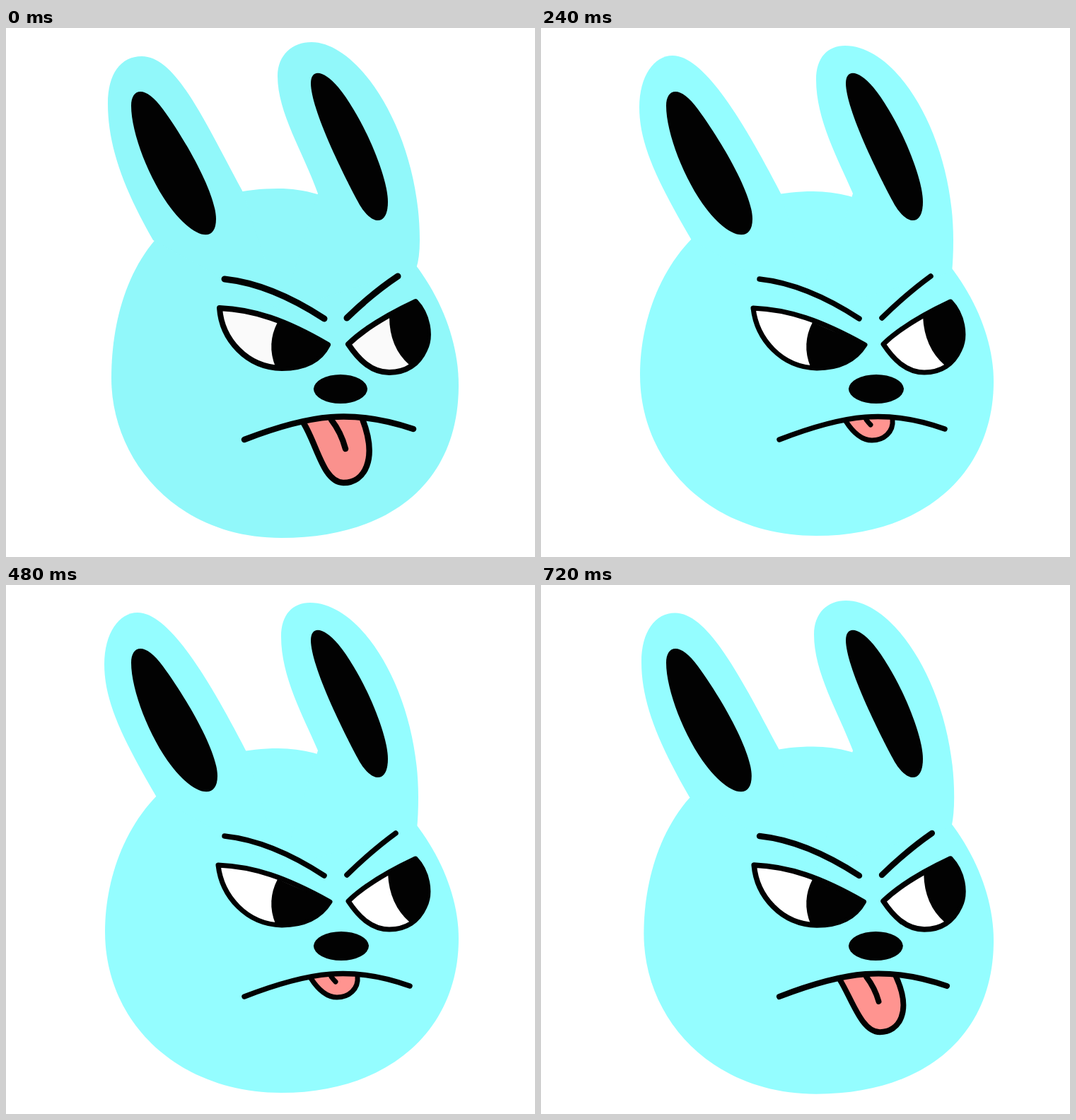
These frames come from a looping animation (748 px wide and 748 px high, 800 ms). An HTML page:

```html
<!DOCTYPE html>
<html lang="en">
<head>
<meta charset="utf-8">
<title>Cheeky rabbit</title>
<style>
html, body { margin: 0; width: 100%; height: 100%; overflow: hidden; background: #fff; }
svg { display: block; width: 100%; height: 100%; }
path { stroke-linecap: round; stroke-linejoin: round; }
</style>
</head>
<body>
<svg id="stage" viewBox="0 0 748 748"></svg>
<script>
const STEP = 80;
const STEPS = 10;
const INK = '#020202';
const SKIN = [148, 253, 255], WHITE = [255, 255, 255], PINK = [255, 148, 144];

// "a~b" in a path runs from a (tense) to b (calm).
const HEAD = `M149~140 495~490C149~140 370~380 205 227~231 385 227~231
  C520 227~231 640 370~375 640 505~500C640 645~630 540 721~718 389 721~718
  C240~245 721~718 149~140 610~620 149~140 495~490Z`;
const EARS = [
  `M208~213 300C165 225~218 144~139 165 144~139 107~112
   C144~139 65~68 162~160 40~39 192~186 40~39C240~230 40~39 280~285 130 334~339 230~234L390 400Z`,
  `M441 234C420 175~185 384~389 120~130 384~389 68~73C384~389 38~42 405 20~25 432~430 20~25
   C500~505 20~25 585~583 150~155 585~583 300Q585~583 325 580~581 340~345L390 400Z`
];
const INNER_EARS = [
  'M177 110C177 85 197 80 222 115C255 160 297~299 235 297~299 270C297~299 300 275 298 250 274C212 238 177 155 177 110Z',
  'M431 78C431 58 448 58 470 84C505 127 540 210 540 246C540 280 518 280 500 250C478 210 431 115 431 78Z'
];
const BROWS = ['M309 355Q375 362 450 411', 'M482 410Q518 375 554~551 351'];
const EYES = [
  'M302~300 396C350 398 395 413 455~458 448C443 472 420 481 390 481C340 480 305 440 302~300 396Z',
  'M484 447Q515 417 579 387C596 405 602 435 592 455C583 475 566 487 542 487C516 487 498 468 484 447Z'
];
const PUPILS = [
  'M384 416Q368 447 381 479Q435 482 455~458 448Z',
  'M542~540 408Q542 452 571 477Q594 462 597 430Q592 400 579 387Z'
];
const MOUTH = 'M337 582C430 546 490 538 576~571 567';

const mix = (a, b, k) => a + (b - a) * k;

function drawTongue(out, color, width) {
  const x = 468 + 9 * out + 7 * Math.sin(Math.PI * out);
  const y = 583 + 60 * out;
  const edge = `M${431 - 10 * out} ${556 + 3 * out}
    C440 ${570 + 20 * out} ${x - 16 - 12 * out} ${y} ${x} ${y}
    C${x + 16 + 14 * out} ${y} ${x + 31 + 18 * out} ${572 + 38 * out} ${497 + 7 * out * out} 553`;
  const crease = `M460 554Q${463 + 11 * out} ${558 + 14 * out} ${466 + 14 * out} ${561 + 34 * out}`;
  return `<path d="${edge}L470 551Z" fill="${color}"/>
    <path d="${edge}${crease}" fill="none" stroke="${INK}" stroke-width="${width}"/>`;
}

// calm: 0 tense to 1 relaxed; out: tongue length 0 to 1, below 0 for none.
function drawRabbit(calm, out) {
  const light = calm ? 1 : 0.98;
  const tint = rgb => `rgb(${rgb.map(v => Math.round(v * light))})`;
  const draw = (d, fill, width = 0) => {
    const shape = d.replace(/(\d+)~(\d+)/g, (_, a, b) => mix(+a, +b, calm));
    return `<path d="${shape}" fill="${fill}" stroke="${width ? INK : 'none'}" stroke-width="${width}"/>`;
  };
  return [
    ...[HEAD, ...EARS].map(d => draw(d, tint(SKIN))),
    ...INNER_EARS.map(d => draw(d, INK)),
    ...BROWS.map(d => draw(d, 'none', mix(9, 7.5, calm))),
    ...EYES.map(d => draw(d, tint(WHITE), mix(8, 7, calm))),
    ...PUPILS.map(d => draw(d, INK)),
    `<ellipse cx="${mix(473, 474, calm)}" cy="510.5" rx="${mix(38, 39, calm)}" ry="20.5" fill="${INK}"/>`,
    out < 0 ? '' : drawTongue(out, tint(PINK), mix(8.5, 7, calm)),
    draw(MOUTH, 'none', mix(8.5, 7.5, calm))
  ].join('');
}

// The tongue slips in over the first half of the loop and back out over the second.
function poseAt(step) {
  if (step === 0) return [0, 1];
  if (step === STEPS - 1) return [0.4, 0.82];
  const fromMiddle = Math.min(step, STEPS - 1 - step);
  return [1, 0.275 * (3 - fromMiddle)];
}

const stage = document.getElementById('stage');
const start = performance.now();
let shown = -1;

function tick() {
  const time = Math.max(0, performance.now() - start);
  const step = Math.floor(time / STEP) % STEPS;
  if (step !== shown) {
    stage.innerHTML = drawRabbit(...poseAt(step));
    shown = step;
  }
  requestAnimationFrame(tick);
}
tick();
</script>
</body>
</html>
```
